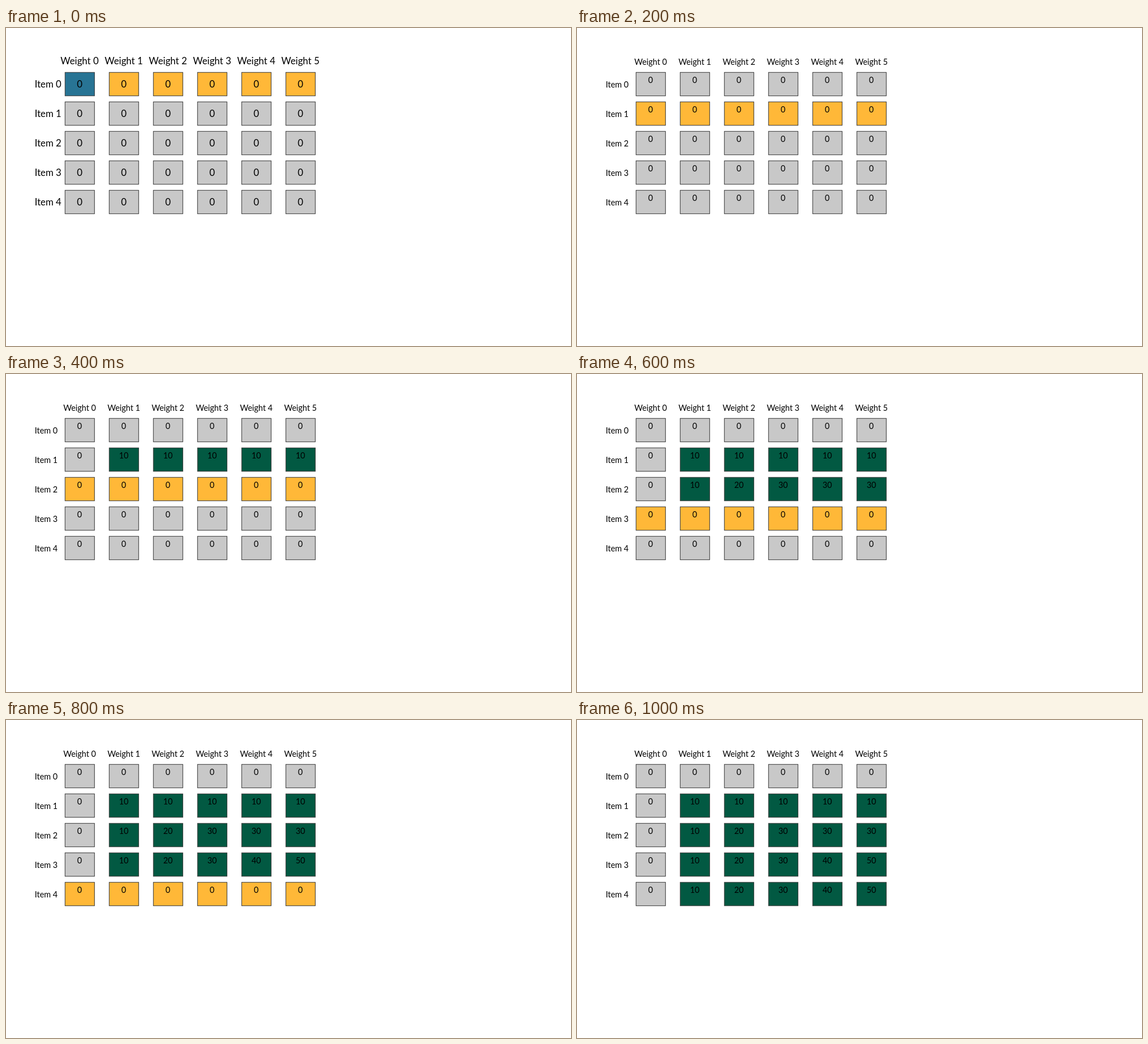
Write an HTML page that moves like this. It is 998 px wide and 561 px high and loops after 1.2 s.

```html
<!DOCTYPE html>
<html lang="en">
<head>
<meta charset="utf-8">
<title>Knapsack table</title>
<style>
html, body { margin: 0; width: 100%; height: 100%; overflow: hidden; background: #fff; }
svg { display: block; width: 998px; height: 561px; font-family: Lato, sans-serif; }
rect { stroke: #333; stroke-width: 1; }
.mid { text-anchor: middle; }
</style>
</head>
<body>
<svg id="stage" viewBox="0 0 998 561"></svg>
<script>
const ROWS = 5, COLS = 6, STEP = 200;
const GREY = '#c8c8c8', BLUE = '#287494', ORANGE = '#ffb838', GREEN = '#025942';
const stage = document.getElementById('stage');

// Item i weighs i and is worth 10 * i.
const best = [Array(COLS).fill(0)];
for (let i = 1; i < ROWS; i++) {
  best[i] = best[i - 1].map((v, w) => w < i ? v : Math.max(v, best[i - 1][w - i] + 10 * i));
}

const text = (x, y, size, str, cls = '') =>
  `<text x="${x}" y="${y}" font-size="${size}" class="${cls}">${str}</text>`;

function cell(row, col, step, size) {
  const x = 104.3 + 78 * col, y = 78.3 + 52 * row;
  const value = row < step ? best[row][col] : 0;
  const fill = row === step ? (step + col ? ORANGE : BLUE) : value ? GREEN : GREY;
  return `<rect x="${x}" y="${y}" width="52" height="41.4" fill="${fill}"/>` +
    text(x + 25.7, y + (step ? 18.4 : 27), size, value, 'mid');
}

function draw(step) {
  const size = step ? 14.4 : 16.8;
  let out = '';
  for (let c = 0; c < COLS; c++) {
    out += text(130 + 78 * c, step ? 65 : 64.3, size, 'Weight ' + c, 'mid');
  }
  for (let r = 0; r < ROWS; r++) {
    out += text(50.7, 105 + 52 * r, size, 'Item ' + r);
    for (let c = 0; c < COLS; c++) out += cell(r, c, step, size);
  }
  stage.innerHTML = out;
}

let shown = -1;
function tick() {
  const step = Math.floor(performance.now() / STEP) % (ROWS + 1);
  if (step !== shown) draw(shown = step);
  requestAnimationFrame(tick);
}
tick();
</script>
</body>
</html>
```
